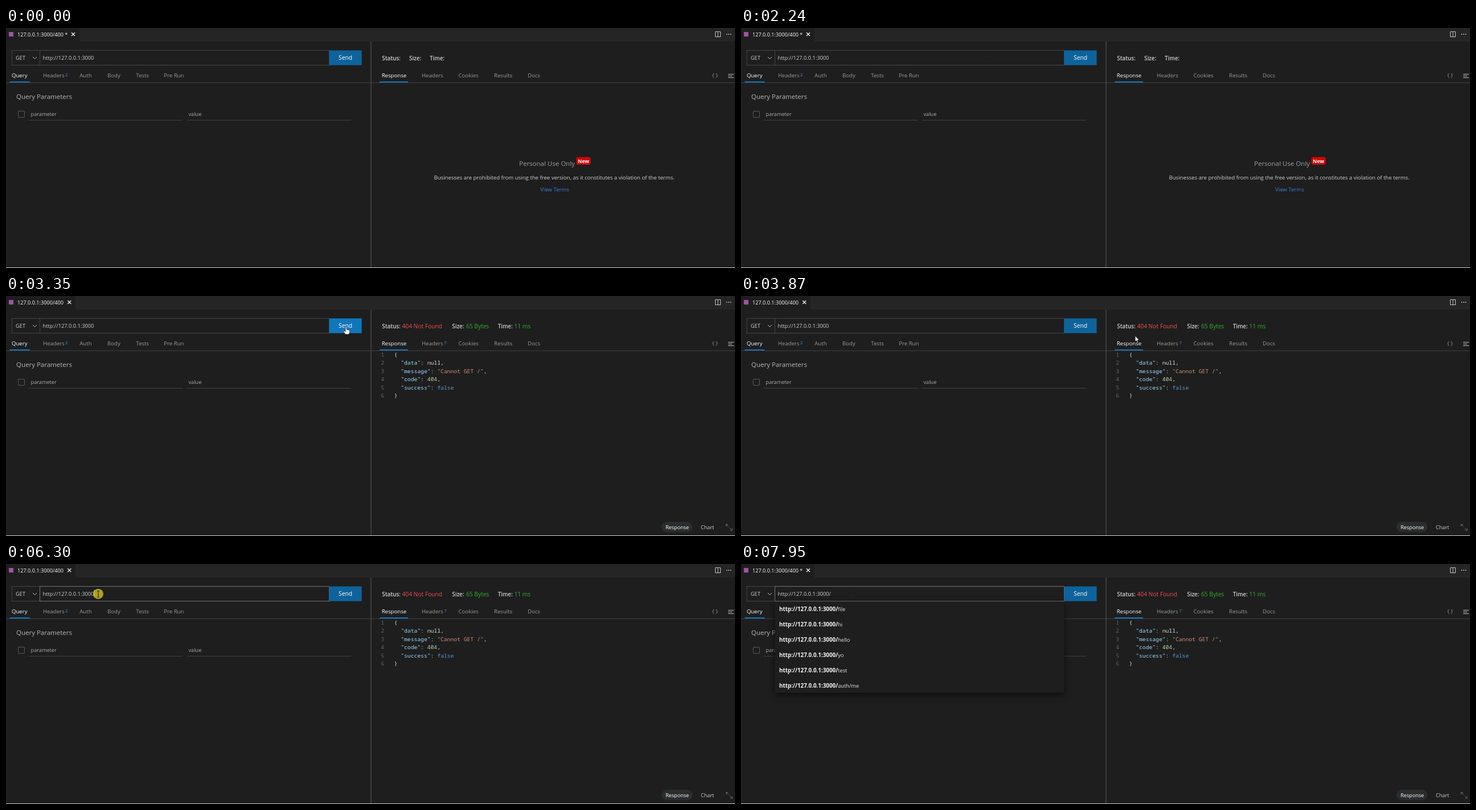
Write an HTML page that moves like this. It is 1280 px wide and 423 px high and loops after 8 s.

```html
<!DOCTYPE html>
<html lang="en">
<head>
<meta charset="utf-8">
<title>API client</title>
<style>
html, body { margin: 0; width: 100%; height: 100%; overflow: hidden; background: #1e1e1e; }
svg { display: block; width: 100%; height: 100%; }
text { font: 9.6px "Open Sans", "Noto Sans", sans-serif; fill: #d0d0d0; white-space: pre; }
.tab { fill: #9a9a9a; }
.on { fill: #fff; }
.hot { fill: #ddd; }
.small { font-size: 9.25px; }
.title { font-size: 9.15px; fill: #fff; }
.hint { font-size: 9.2px; fill: #adadad; }
.head { font-size: 11.5px; fill: #b8b8b8; }
.dim { fill: #a0a0a0; }
.strong { font-size: 9.8px; font-weight: 600; }
.value { font-size: 10.2px; font-weight: 500; }
.bad { fill: #f14c4c; }
.good { fill: #2fb02f; }
.send { font-size: 10.3px; fill: #fff; }
.sup { font-size: 7.5px; fill: #3f9cf0; }
.new { font-size: 8.8px; font-weight: 700; fill: #fff; }
.pill { font-size: 9.1px; }
.link { fill: #3a80d4; }
.code { font: 9.7px "Noto Sans Mono", "DejaVu Sans Mono", monospace; fill: #dcdcdc; }
.num { fill: #646464; text-anchor: end; }
.key { fill: #9cdcfe; } .str { fill: #ce9178; } .int { fill: #b5cea8; } .bool { fill: #569cd6; }
.item { font-size: 9.25px; fill: #e8e8e8; }
.item tspan { font-size: 9.8px; font-weight: 700; fill: #f4f4f4; }
.line { fill: none; stroke: #414141; }
.icon { fill: none; stroke: #c5c5c5; }
#menu rect { filter: drop-shadow(0 4px 6px rgba(0,0,0,.6)); }
</style>
</head>
<body>
<svg id="stage" viewBox="0 0 1280 423" preserveAspectRatio="none"></svg>
<script>
const LOOP = 8000, STEP = 65;
const stage = document.getElementById('stage');

const text = (x, y, str, cls = '', id = '') => `<text x="${x}" y="${y}" class="${cls}" id="${id}">${str}</text>`;
const rect = (x, y, w, h, fill, extra = '') => `<rect x="${x}" y="${y}" width="${w}" height="${h}" fill="${fill}" ${extra}/>`;
const path = (d, cls, extra = '') => `<path d="${d}" class="${cls}" ${extra}/>`;
const group = (id, ...parts) => `<g id="${id}">${parts.join('')}</g>`;
const span = (cls, str) => `<tspan class="${cls}">${str}</tspan>`;

const topBar = () => [
  rect(0, 0, 1280, 24, '#252526'),
  rect(0, 0, 129, 24, '#1e1e1e', 'id="fileTab"'),
  rect(5, 7, 8, 8, '#9b559f'),
  text(20, 15, '', 'title', 'fileName'),
  path('M-3 8l6 6m0-6l-6 6', 'icon', 'id="close" style="stroke:#fff;stroke-width:1.2"'),
  path('M1245.5 6.5h9v9h-9zM1250 6.5v9', 'icon'),
  [1265.5, 1269, 1272.5].map(x => `<circle cx="${x}" cy="11" r=".9" fill="#c5c5c5"/>`).join('')
].join('');

const requestPane = () => [
  rect(10.5, 39.5, 557, 26, 'none', 'stroke="#454545"'),
  path('M47 51l3.5 3.5 3.5-3.5', 'icon'),
  text(17, 56, 'GET', 'small'),
  rect(59.5, 39.5, 508, 26, 'none', 'stroke="#454545" id="urlBox"'),
  text(64.5, 56, '', 'small', 'url'),
  rect(567.5, 39.5, 57, 26, '#0e639c', 'id="sendBox"'),
  text(584, 56, 'Send', 'send'),
  text(10, 87, 'Query', 'on'),
  text(65, 87, 'Headers', 'tab', 'headersTab'),
  text(104, 85, '2', 'sup'),
  [[129.3, 'Auth'], [178, 'Body'], [228.3, 'Tests'], [277.3, 'Pre Run']]
    .map(([x, s]) => text(x, 87, s, 'tab')).join(''),
  path('M0 96.5H641', 'line'),
  rect(6.5, 94, 35, 2, '#0e70b5'),
  text(18, 125, 'Query Parameters', 'head'),
  rect(18, 139.5, 606.5, 23, '#2a2d2e', 'id="rowHover"'),
  path('M40 162.5H310M318 162.5H606', 'line'),
  rect(21.5, 146.5, 11, 11, 'none', 'rx="1.5" stroke="#5a5a5a"'),
  text(43.5, 155, 'parameter', 'hint'),
  text(320.5, 155, 'value', 'hint')
].join('');

const emptyReply = () => group('empty',
  text(708, 57, 'Size:', 'strong'),
  text(744, 57, 'Time:', 'strong'),
  text(901, 243, 'Personal Use Only', 'head dim'),
  rect(1001.5, 227.5, 25, 13.5, '#cf0707', 'rx="3"'),
  text(1004, 238, 'New', 'new'),
  text(751.5, 267, 'Businesses are prohibited from using the free version, as it constitutes a violation of the terms.'),
  text(938, 288, 'View Terms', 'link'));

const codeLines = [
  '{',
  `  ${span('key', '"data"')}: null,`,
  `  ${span('key', '"message"')}: ${span('str', '"Cannot GET /"')},`,
  `  ${span('key', '"code"')}: ${span('int', '404')},`,
  `  ${span('key', '"success"')}: ${span('bool', 'false')}`,
  '}'
];

const reply = () => group('reply',
  text(695.5, 57, '404 Not Found', 'value bad'),
  text(783.3, 57, 'Size:', 'strong'),
  text(808, 57, '65 Bytes', 'value good'),
  text(863.7, 57, 'Time:', 'strong'),
  text(892.5, 57, '11 ms', 'value good'),
  text(769.5, 85, '7', 'sup'),
  codeLines.map((s, i) => {
    const y = Math.round(107 + i * 14.4);
    return text(664, y, i + 1, 'code num') + text(681.6, y, s, 'code');
  }).join(''),
  rect(1151, 398, 54.5, 18, '#2a2d2e', 'rx="9"'),
  text(1158, 411, 'Response', 'pill on'),
  text(1220, 411, 'Chart', 'pill'),
  path('M1264.5 406v-3.5h3.5M1264.5 402.5l4.5 4.5M1275 409.5v3.5h-3.5M1275 413l-4.5-4.5', 'icon', 'style="stroke:#686868"'));

const responsePane = () => [
  path('M641 24V422', 'line', 'style="stroke:#4a4a4a;stroke-width:1.4"'),
  text(660.3, 57, 'Status:', 'strong'),
  text(659.7, 87, 'Response', 'on'),
  [[730, 'Headers'], [794.5, 'Cookies'], [857, 'Results'], [916, 'Docs']]
    .map(([x, s]) => text(x, 87, s, 'tab')).join(''),
  text(1240, 87, '{ }', 'tab'),
  path('M1268 81.5h10M1268 84.5h7M1268 87.5h10', 'icon'),
  path('M642 96.5H1280', 'line'),
  rect(656, 94, 50, 2, '#0e70b5'),
  emptyReply(), reply(),
  group('copy',
    rect(1234.5, 101.5, 35.5, 22.5, '#1e1e1e', 'rx="2" stroke="#3a3a3a"'),
    text(1240.5, 117, 'Copy'))
].join('');

const menu = () => group('menu',
  rect(59.5, 66, 508, 161, '#1e1e1e'),
  ['file', 'hi', 'hello', 'yo', 'test', 'auth/me'].map((s, i) =>
    text(67, Math.round(83 + i * 26.9), `<tspan>http://127.0.0.1:3000/</tspan>${s}`, 'item')).join(''));

const beam = 'M-2-5.5h1.3l.7.7.7-.7H2M-2 5.5h1.3l.7-.7.7.7H2M0-5V5';
const pointer = () => group('pointer',
  path('M0 0V10L2.3 8 3.9 11.6 5.4 11 3.9 7.4H7Z', '', 'id="arrow" fill="#fff" stroke="#000" stroke-width=".6"'),
  path('M-1 1Q0-1 1.2 1V5L5 5.8Q6.4 6.2 6.4 7.6V10.5L5 13.6H-1L-4.6 8.6Q-4.4 6.8-2.8 7.6L-1 9Z', '',
    'id="hand" fill="#fff" stroke="#000" stroke-width=".6"'),
  group('beam', path(beam, '', 'fill="none" stroke="#888" stroke-opacity=".25" stroke-width="1.8"'),
    path(beam, '', 'fill="none" stroke="#000" stroke-opacity=".8"')));

stage.innerHTML = rect(0, 0, 1280, 423, '#1e1e1e') + topBar() + requestPane() + responsePane() + menu() +
  rect(0, 422, 1280, 1, '#d9d2d2') +
  rect(0, 46, 1, 12.5, '#eee', 'id="caret"') +
  '<circle id="click" r="9" fill="#d7c814" fill-opacity=".77"/>' + pointer();

const el = {};
stage.querySelectorAll('[id]').forEach(n => { if (n.id) el[n.id] = n; });

// Pointer moves as [time, x, y]; it rests between moves.
const moves = [
  [[530, 1074, 406], [700, 900, 330], [920, 480, 215], [1110, 189, 131], [1180, 125, 106], [1245, 96, 84], [1310, 163, 74]],
  [[1380, 165, 65], [1440, 169, 57], [1560, 172, 51]],
  [[1840, 180, 51], [2100, 330, 50], [2350, 520, 52], [2620, 597, 56]],
  [[2700, 597, 55], [2830, 597, 54]],
  [[3750, 622, 57], [3870, 689, 69], [4100, 760, 100], [4320, 730, 128], [4540, 690, 138]],
  [[5510, 670, 149], [5750, 430, 112], [6000, 240, 72], [6150, 176, 55], [6300, 162, 53]],
  [[6500, 166, 53], [6810, 196, 53.5]]
];

function pointerAt(t) {
  const keys = moves.filter(m => m[0][0] <= t).pop();
  if (!keys) return null;
  const start = keys[0][0], last = keys[keys.length - 1];
  const s = start + Math.floor((t - start) / STEP + 0.25) * STEP;
  if (s >= last[0] || t >= last[0]) return { x: last[1], y: last[2] };
  const i = keys.findIndex(k => k[0] > s);
  const [a, b] = [keys[i - 1], keys[i]];
  const u = (s - a[0]) / (b[0] - a[0]);
  return { x: a[1] + (b[1] - a[1]) * u, y: a[2] + (b[2] - a[2]) * u };
}

const show = (node, on) => node.setAttribute('visibility', on ? 'visible' : 'hidden');
const label = (node, str) => { if (node.textContent !== str) node.textContent = str; };
const within = (t, a, b) => t >= a && t < b;
const inside = (p, x0, y0, x1, y1) => !!p && p.x >= x0 && p.x < x1 && p.y >= y0 && p.y < y1;

function draw(t) {
  const p = pointerAt(t);
  const replied = t >= 3285, typed = t >= 7350, focused = t >= 6300;
  const dirty = !replied || typed;

  label(el.fileName, '127.0.0.1:3000/400' + (dirty ? ' *' : ''));
  el.fileTab.setAttribute('width', dirty ? 129 : 122);
  el.close.setAttribute('transform', `translate(${dirty ? 118 : 111.3} 0)`);
  label(el.url, 'http://127.0.0.1:3000' + (typed ? '/' : ''));
  el.urlBox.setAttribute('stroke', focused ? '#767676' : '#454545');
  show(el.empty, !replied);
  show(el.reply, replied);
  show(el.menu, t >= 7430);
  show(el.rowHover, within(t, 1045, 1170));
  show(el.copy, replied && inside(p, 642, 97, 1280, 422));

  const onSend = inside(p, 568, 39, 625, 66);
  const onHeaders = inside(p, 61, 76, 113, 96);
  const onUrl = inside(p, 60, 39, 568, 66);
  el.sendBox.setAttribute('fill', onSend ? '#1177bb' : '#0e639c');
  el.headersTab.setAttribute('class', onHeaders ? 'hot' : 'tab');

  show(el.arrow, p && !onSend && !onHeaders && !onUrl);
  show(el.hand, onSend || onHeaders);
  show(el.beam, onUrl);
  if (p) el.pointer.setAttribute('transform', `translate(${p.x} ${p.y})`);

  show(el.caret, within(t, 6300, 6810) || within(t, 7350, 7950));
  el.caret.setAttribute('x', typed ? 158 : 154.5);
  show(el.click, within(t, 3080, 3220) || within(t, 6300, 6360));
  el.click.setAttribute('cx', focused ? 162 : 596);
  el.click.setAttribute('cy', focused ? 52.7 : 55);
}

const origin = performance.now();
function tick() {
  draw((performance.now() - origin) % LOOP);
  requestAnimationFrame(tick);
}
draw(0);
requestAnimationFrame(tick);
</script>
</body>
</html>
```
